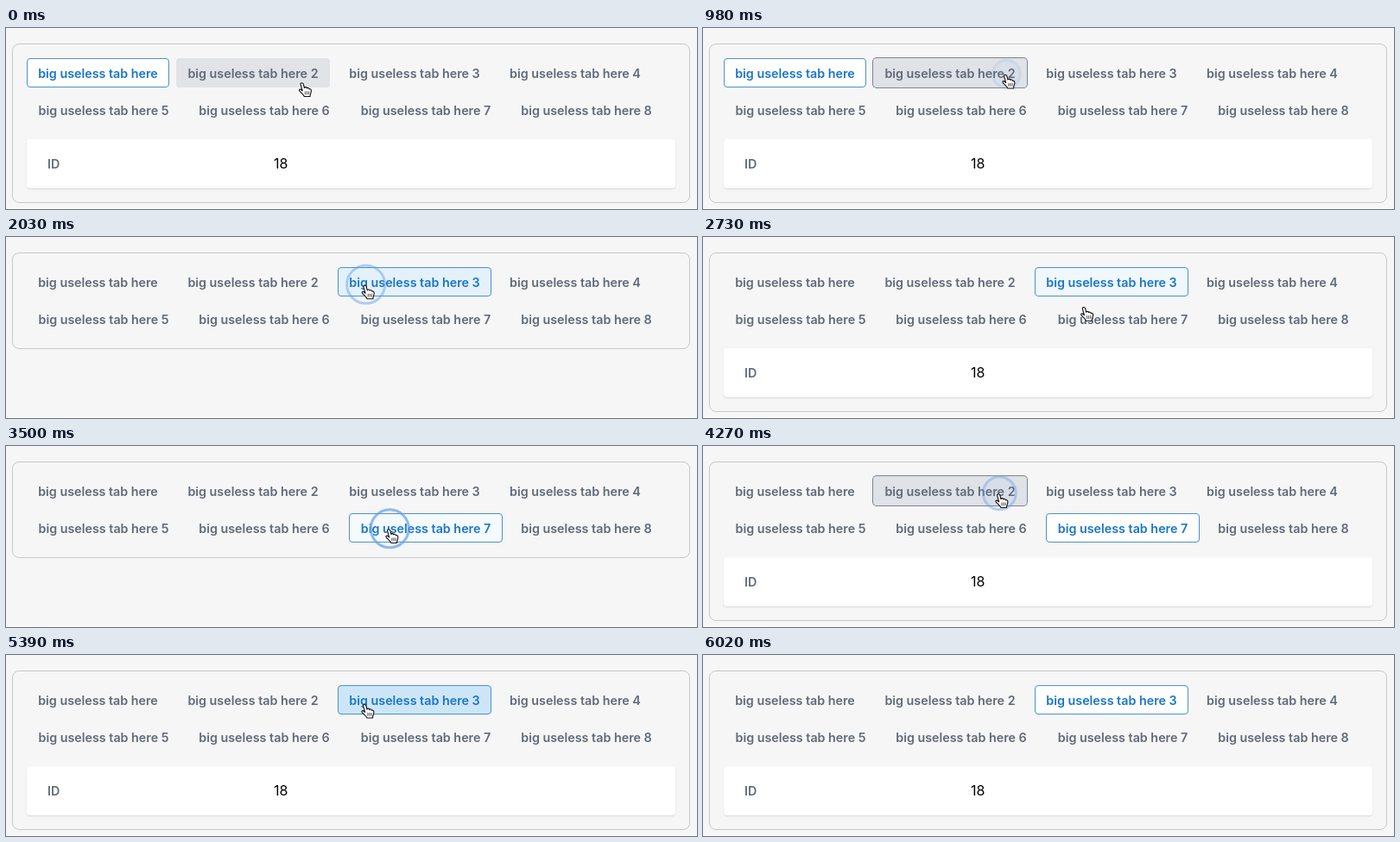
Animation, 800 px wide and 210 px high, one loop 6.3 s. Source, as an HTML page:

```html
<!DOCTYPE html>
<html lang="en">
<head>
<meta charset="utf-8">
<title>Tabs</title>
<style>
  html, body { margin: 0; width: 100%; height: 100%; overflow: hidden; background: #f6f6f6; }
  #stage {
    position: relative; width: 800px; height: 210px; overflow: hidden;
    font: 600 14.3px Inter, sans-serif; color: #606a79;
  }
  #stage div, #stage svg { position: absolute; box-sizing: border-box; }
  #stage .edge { left: 0; top: 209px; width: 800px; height: 1px; background: #fff; }
  #panel { left: 7px; top: 18px; width: 785px; border: 1px solid #c8c8c8; border-radius: 8px; }
  #card {
    left: 24px; top: 129px; width: 751px; height: 57px; line-height: 57px;
    background: #fff; border-radius: 4px; box-shadow: 0 1px 2px rgba(0, 0, 0, .13);
  }
  #card .key { left: 24px; }
  #card .value { left: 286px; font-weight: 400; font-size: 16px; color: #000; }
  .tab {
    height: 34px; border: 1px solid transparent; border-radius: 4px;
    display: flex; align-items: center; justify-content: center; white-space: nowrap;
  }
  #overlay { left: 0; top: 0; }
</style>
</head>
<body>
<div id="stage">
  <div class="edge"></div>
  <div id="panel"></div>
  <div id="card"><div class="key">ID</div><div class="value">18</div></div>
  <svg id="overlay" width="800" height="210">
    <circle id="ring" fill="#5b9cf0" stroke="#5b9cec" stroke-width="3"/>
    <g id="hand" stroke="#111" stroke-width="1.2" stroke-linejoin="round" stroke-linecap="round">
      <path fill="#fff" d="M-2 2.2C-2.6 .2 .6 -.6 1.3 1.4L2.6 6.4C3.4 5 5.4 5.3 5.6 6.8C6.6 5.8 8.3 6.3 8.5 7.8C9.7 7.2 10.9 8 11 9.5C11.2 12 10 13.6 9.8 15.2L9.6 17H2.4C1.8 14.6 -2.2 12 -3.6 9.8C-4.4 8.2 -2.4 7.4 -1 9L.2 10Z"/>
      <path fill="none" stroke-width=".8" d="M3.6 11v3.2M5.8 11v3.2M8 11v3.2"/>
    </g>
  </svg>
</div>
<script>
const LOOP = 6300, STEP = 70, HOLD = 140, FADE = 200;
const $ = id => document.getElementById(id);
const stage = $('stage'), panel = $('panel'), card = $('card'), ring = $('ring'), hand = $('hand');

// [time, x, y] of the fingertip
const path = [
  [0, 343, 63.5], [420, 350.5, 54], [1610, 350.5, 54], [1820, 414, 55], [1960, 414, 55],
  [2380, 439, 66], [3080, 443.5, 96.5], [3900, 443.5, 96.5], [4180, 342.5, 55.5],
  [4550, 342.5, 55.5], [4800, 415.5, 57], [5460, 415.5, 57], [5950, 432, -32]
];
// [time, tab]
const presses = [[980, 1], [1820, 2], [3360, 6], [4200, 1], [4830, 2]];
// [tab, enter, leave]
const hovers = [[1, -FADE, 1750], [2, 1750, 2590], [6, 2740, 3990], [1, 4060, 4620], [2, 4680, 5600]];
const loading = [[1120, 1540], [1960, 2310], [3500, 3850]];

const tabs = Array.from({ length: 8 }, (_, i) => {
  const el = document.createElement('div'), col = i % 4, row = i >> 2;
  el.className = 'tab';
  el.textContent = 'big useless tab here' + (i ? ' ' + (i + 1) : '');
  el.style.left = Math.round(24 + col * 186.3 - (!row && col ? 13 : 0)) + 'px';
  el.style.top = 35 + row * 43 + 'px';
  el.style.width = (i ? 178 : 165) + 'px';
  stage.insertBefore(el, $('overlay'));
  return el;
});

const clamp = v => Math.max(0, Math.min(1, v));
const mix = (a, b, k) => a + (b - a) * k;
const smooth = k => k * k * (3 - 2 * k);
const tint = k => `rgb(${mix(255, 205, k)},${mix(255, 230, k)},${mix(255, 247, k)})`;

function cursorAt(t) {
  const i = path.findIndex(p => p[0] > t);
  if (i < 0) return path[path.length - 1].slice(1);
  const [t0, x0, y0] = path[i - 1], [t1, x1, y1] = path[i];
  const k = smooth((t - t0) / (t1 - t0));
  return [mix(x0, x1, k), mix(y0, y1, k)];
}

function hoverOf(tab, t) {
  let h = 0;
  for (const [n, enter, leave] of hovers)
    if (n === tab) h = Math.max(h, Math.min(clamp((t - enter) / FADE), clamp(1 - (t - leave) / FADE)));
  return h;
}

function render(t) {
  let selected = 0, since = -LOOP, pressed = -1, age = LOOP;
  for (const [at, tab] of presses) {
    if (t < at) break;
    age = t - at;
    pressed = age < HOLD ? tab : -1;
    if (age >= HOLD) { selected = tab; since = at + HOLD; }
  }

  tabs.forEach((el, i) => {
    const h = hoverOf(i, t), s = el.style, down = i === pressed;
    if (i === selected) {
      s.background = tint(Math.min(h, clamp((t - since + 40) / FADE)));
      s.borderColor = '#4a90d2';
      s.color = '#1a76ca';
    } else {
      s.background = down ? '#dfe2e6' : `rgba(225,227,231,${h})`;
      s.borderColor = 'transparent';
      s.color = '';
    }
    s.boxShadow = down ? '0 0 0 1px #7b8591' : '';
  });

  const busy = loading.some(([a, b]) => t >= a && t < b);
  card.style.display = busy ? 'none' : '';
  panel.style.height = (busy ? 112 : 185) + 'px';

  const [x, y] = cursorAt(t);
  hand.setAttribute('transform', `translate(${x} ${y}) scale(.94)`);
  const grow = clamp(age / HOLD);
  ring.setAttribute('cx', x + .8);
  ring.setAttribute('cy', y - .7);
  ring.setAttribute('r', mix(16, 22, grow));
  ring.setAttribute('fill-opacity', mix(.3, 0, grow));
  ring.setAttribute('opacity', mix(.15, .68, grow) * clamp(1 - (age - HOLD) / 210));
}

function tick(now) {
  render(Math.floor(now % LOOP / STEP) * STEP);
  requestAnimationFrame(tick);
}
render(0);
requestAnimationFrame(tick);
</script>
</body>
</html>
```
